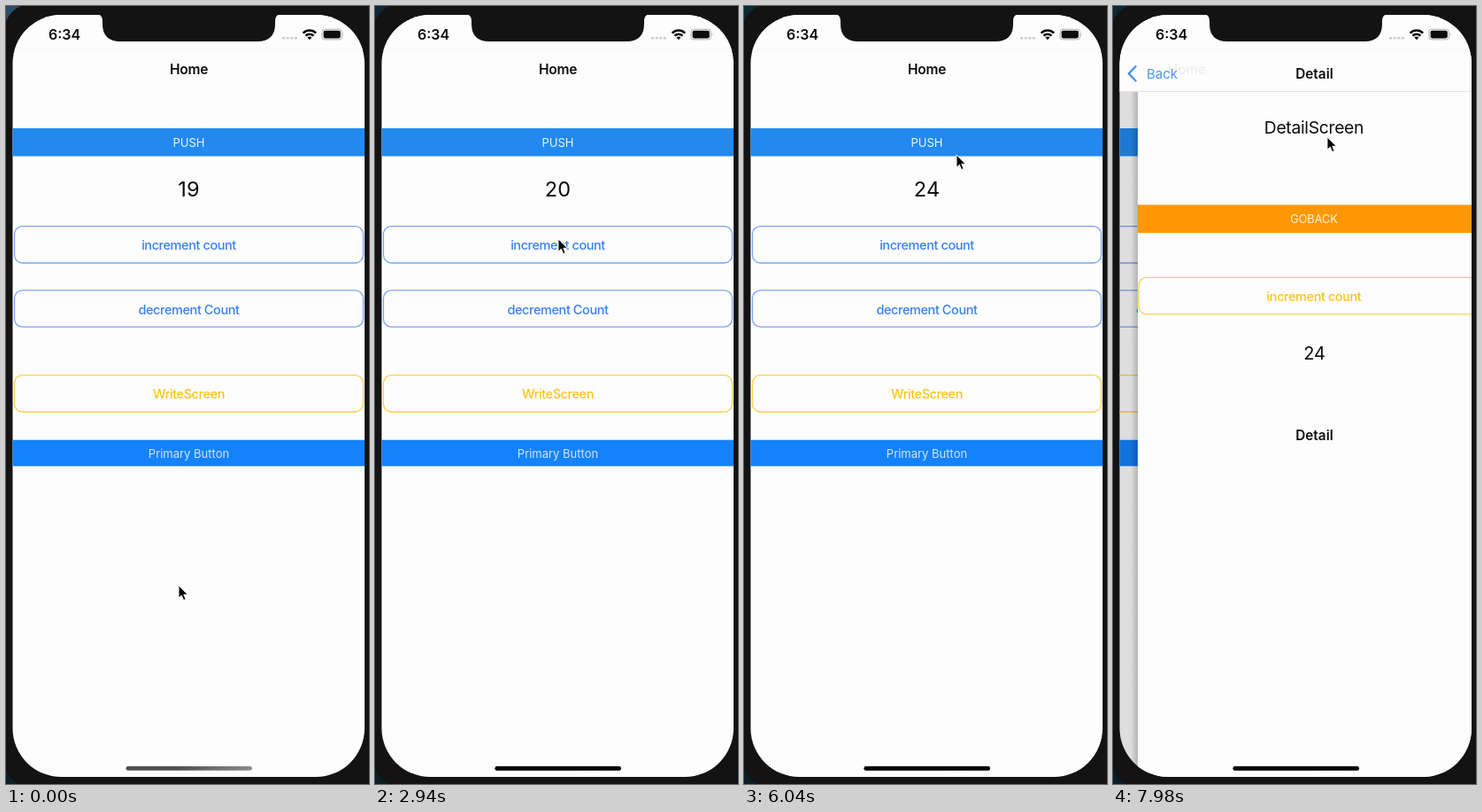
Recreate the animation shown at these times as an HTML page. Size 410 px wide and 878 px high, loop 8 s.

```html
<!DOCTYPE html>
<html lang="en">
<head>
<meta charset="utf-8">
<title>Counter app</title>
<style>
  html, body { margin: 0; width: 100%; height: 100%; overflow: hidden; background: #131313; }
  svg { display: block; width: 410px; height: 878px; }
  text { font-family: Inter, Roboto, sans-serif; text-anchor: middle; }
</style>
</head>
<body>
<svg id="stage" viewBox="0 0 410 878"></svg>
<script>
const LOOP = 8000;
const WIDTH = 398;
const PARALLAX = 130;
const PAPER = '#fdfdfd';
const INK = '#0c0c0c';
const BEZEL = '#131313';
const BLUE = '#3a7ff0';
const BLUE_LINE = '#78a4f4';
const GOLD = '#fcc419';
const GOLD_LINE = '#ffcd4a';

const label = (str, x, cy, size, fill, extra = '') =>
  `<text x="${x}" y="${cy + size * 0.36}" font-size="${size}" fill="${fill}" ${extra}>${str}</text>`;
const bold = 'font-weight="600"';
const tight = v => `letter-spacing="${-v}"`;
const caption = (str, x, cy, fill, extra = '') =>
  label(str, x, cy, 14.5, fill, `font-weight="450" ${tight(0.42)} ${extra}`);
const bar = (y, h, fill) => `<rect x="7" y="${y}" width="${WIDTH}" height="${h}" fill="${fill}"/>`;
const outline = (x, y, stroke, extra = '') =>
  `<rect ${extra} x="${x}" y="${y}" width="394" height="41.4" rx="9" fill="none" stroke="${stroke}" stroke-width="1.3"/>`;

const home = `
  <g id="home">
    <g id="push">${bar(138, 31.5, '#2189f0')}${label('PUSH', 206.5, 154, 13, '#eef5fc')}</g>
    ${label('19', 206.5, 207, 23.5, INK, 'id="count" letter-spacing=".2"')}
    ${outline(9.5, 248.6, BLUE_LINE, 'id="incBox"')}
    ${caption('increment count', 206.5, 270, BLUE, 'id="incText"')}
    ${outline(9.5, 320.8, BLUE_LINE)}
    ${caption('decrement Count', 206.5, 342.3, BLUE)}
    ${outline(9.5, 416.6, GOLD_LINE)}
    ${caption('WriteScreen', 206.5, 438.2, GOLD)}
    ${bar(489.7, 29.6, '#1482fb')}
    ${label('Primary Button', 206.5, 505, 13, '#d2e6fb')}
  </g>
  <rect id="dimmer" x="7" y="96" width="${WIDTH}" height="776"/>`;

const detail = `
  <g id="detail">
    <rect id="shade" x="-1" y="96" width="8" height="776" fill="url(#edge)"/>
    <rect x="7" y="96" width="${WIDTH}" height="776" fill="${PAPER}"/>
    ${label('DetailScreen', 206, 137.5, 19.3, INK, tight(0.3))}
    ${bar(224.4, 31.6, '#ff9804')}
    ${label('GOBACK', 206, 240.5, 12.7, '#fff3dc')}
    ${outline(8, 306.4, GOLD_LINE)}
    ${caption('increment count', 206, 327.6, GOLD)}
    ${label('24', 206.5, 391.5, 20, INK, tight(0.3))}
    ${label('Detail', 206.5, 484, 15.3, INK, bold)}
  </g>`;

const header = `
  <rect x="7" y="9" width="${WIDTH}" height="41" fill="${PAPER}"/>
  <g id="navBar">
    <rect x="7" y="50" width="${WIDTH}" height="46" fill="${PAPER}"/>
    <path d="M7 96.5H405" stroke="#e4e4e4"/>
  </g>
  <path d="M7 49.8H405" stroke="#f6f6f2" stroke-width=".8"/>
  ${label('Home', 206.5, 71.3, 15.5, INK, `id="homeTitle" ${bold} ${tight(0.25)}`)}
  ${label('Detail', 206.5, 76.3, 15.3, INK, `id="detailTitle" ${bold}`)}
  <g id="back">
    <path d="M26.2 67.5L17.8 76.3L26.2 85" fill="none" stroke="#3587f2" stroke-width="2.3"/>
    <g id="backLabel">${label('Back', 54, 76.3, 15, '#3f8cf0')}</g>
  </g>`;

const status = `
  ${label('6:34', 66, 32.3, 16, INK, bold)}
  <path d="M312 36.3H330" stroke="#cfcfc4" stroke-width="2.6" stroke-dasharray="3 1.6"/>
  <g fill="none" stroke="${INK}" stroke-width="2.4">
    <path d="M335.6 30.6a10.3 10.3 0 0 1 14.6 0"/>
    <path d="M338.4 33.6a6.4 6.4 0 0 1 9 0"/>
  </g>
  <path d="M340.4 35.6a3.6 3.6 0 0 1 5 0L342.9 38.3z" fill="${INK}"/>
  <rect x="357" y="26.3" width="22.4" height="11.6" rx="3" fill="none" stroke="#a8a8a8" stroke-width=".9"/>
  <rect x="358.6" y="27.8" width="19.2" height="8.6" rx="1.8" fill="${INK}"/>
  <path d="M380.8 30.2q1.6 1.8 0 3.8z" fill="#a8a8a8"/>`;

const indicator = (fill, id = '') =>
  `<rect ${id} x="135.5" y="858" width="142.5" height="4.8" rx="2.4" fill="${fill}"/>`;

document.getElementById('stage').innerHTML = `
  <defs>
    <clipPath id="screen"><rect x="7.5" y="10" width="397.5" height="860" rx="55"/></clipPath>
    <linearGradient id="edge">
      <stop offset="0" stop-opacity="0"/>
      <stop offset="1" stop-opacity=".2"/>
    </linearGradient>
    <linearGradient id="faded">
      <stop offset=".4" stop-color="#505050"/>
      <stop offset="1" stop-color="#8c8c8c"/>
    </linearGradient>
  </defs>
  <rect width="410" height="878" fill="${BEZEL}"/>
  <path id="corner" d="M0 0H17Q5 5 0 17z"/>
  <path d="M0 878V862Q5 873 15 878z" fill="#0c2028"/>
  <g clip-path="url(#screen)">
    <rect width="410" height="878" fill="${PAPER}"/>
    ${home}${detail}${header}${status}
    <path d="M103 9Q109 10 109 17V20Q109 40 129 40H284Q304 40 304 20V17Q304 10 310 9z" fill="${BEZEL}"/>
    ${indicator('url(#faded)')}${indicator('#050505', 'id="indicator"')}
  </g>
  <path id="cursor" d="M0 0V14.2L3.3 11.2L5.6 16.6L8.1 15.6L5.8 10.3H10.2z"
    fill="#080808" stroke="#fff" stroke-width=".9"/>`;

const el = {};
document.querySelectorAll('[id]').forEach(n => el[n.id] = n);
const set = (id, attrs) => {
  for (const k in attrs) el[id].setAttribute(k, attrs[k]);
};

const clamp = v => Math.min(1, Math.max(0, v));
const ramp = (t, a, b) => clamp((t - a) / (b - a));
const ease = u => u * u * (3 - 2 * u);
const mix = (a, b, u) => `rgb(${a.map((v, i) => Math.round(v + (b[i] - v) * u))})`;

// time, x, y of the pointer tip
const trail = [
  [840, 195, 654], [1560, 223, 236], [1940, 228, 224], [2420, 207, 263],
  [5700, 207, 263], [6040, 240, 168], [6520, 253, 150], [7440, 253, 150], [7980, 242, 148]
];
const taps = [2800, 3540, 4560, 5080, 5580];
const PUSH_AT = 7312;

function pointer(t) {
  const next = trail.findIndex(k => k[0] > t);
  if (next === 0) return trail[0].slice(1);
  if (next < 0) return trail[trail.length - 1].slice(1);
  const [a, b] = [trail[next - 1], trail[next]];
  const u = ease(ramp(t, a[0], b[0]));
  return [a[1] + (b[1] - a[1]) * u, a[2] + (b[2] - a[2]) * u];
}

function draw(t) {
  const pressed = taps.some(k => t >= k - 90 && t < k + 120);
  el.count.textContent = 19 + taps.filter(k => t >= k).length;
  set('incBox', { fill: pressed ? '#2f6ff8' : 'none', stroke: pressed ? '#2f6ff8' : BLUE_LINE });
  set('incText', { fill: pressed ? '#f2f6fd' : BLUE });

  const touch = ramp(t, 7130, 7220) * (1 - ramp(t, 7300, 7430));
  set('push', { opacity: 1 - 0.6 * touch });

  // settling slide of the pushed page
  const p = t < PUSH_AT ? 0 : 1 - Math.exp(-(t - PUSH_AT) * 0.0044);
  const rest = (1 - p) * WIDTH;
  const parallax = `translate(${-PARALLAX * p} 0)`;
  const slide = `translate(${rest} 0)`;
  const visibility = p > 0 ? 'visible' : 'hidden';
  set('home', { transform: parallax });
  set('dimmer', { opacity: 0.13 * p });
  set('detail', { transform: slide, visibility });
  set('shade', { opacity: 0.5 + 0.5 * p });
  set('navBar', { visibility });
  set('homeTitle', { transform: parallax, opacity: 1 - p });
  set('detailTitle', { transform: slide, visibility });
  set('back', { opacity: clamp((p - 0.3) / 0.7) });
  set('backLabel', { transform: `translate(${84 * (1 - p) - 3} 0)` });

  const dark = ramp(t, 2500, 2900);
  set('indicator', { opacity: dark });
  set('corner', { fill: mix([44, 78, 108], [14, 40, 52], dark) });

  set('cursor', { transform: `translate(${pointer(t)})` });
}

const start = performance.now();
function tick() {
  draw((performance.now() - start) % LOOP);
  requestAnimationFrame(tick);
}
tick();
</script>
</body>
</html>
```
